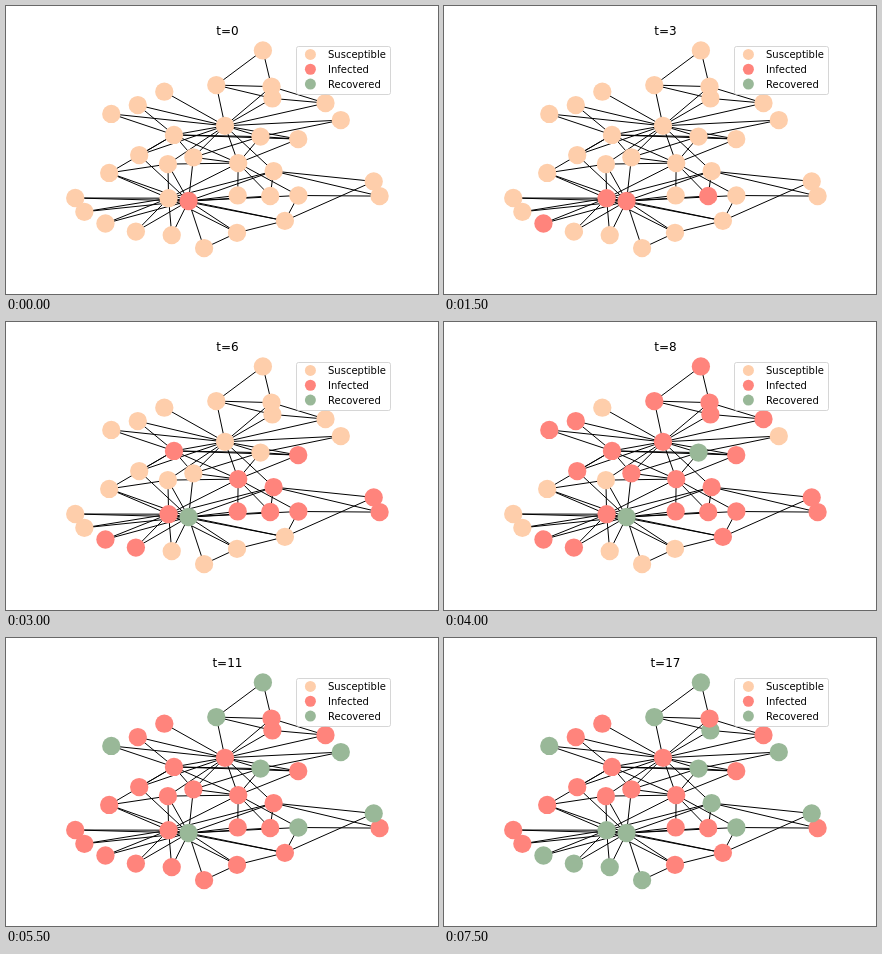
An HTML page for the animation above (8 s loop, 432 px wide and 288 px high).

```html
<!DOCTYPE html>
<html lang="en">
<head>
<meta charset="utf-8">
<title>Epidemic on a network</title>
<style>
  html, body { margin: 0; width: 100%; height: 100%; overflow: hidden; background: #fff; }
  svg { display: block; width: 432px; height: 288px; }
  text { font-family: "DejaVu Sans", sans-serif; font-size: 10px; fill: #000; }
  #title { font-size: 12px; text-anchor: middle; }
  line { stroke: #000; stroke-width: 1; }
</style>
</head>
<body>
<svg viewBox="0 0 432 288">
  <g id="edges"></g>
  <g id="nodes"></g>
  <g id="legend">
    <rect x="290.5" y="40.5" width="94" height="48" rx="2" fill="#fff" fill-opacity=".8" stroke="#ccc" stroke-opacity=".8"/>
  </g>
  <text id="title" x="221.4" y="29"></text>
</svg>
<script>
const STEP = 500, STEPS = 16;
const COLORS = { Susceptible: '#FECEAB', Infected: '#FF847C', Recovered: '#99B898' };
const HUBS = [32, 33];
const hubLeaves = [14, 15, 18, 20, 22];
const topLeaves = [21, 17, 11];

// Key points by node id; the leaves follow from rules below
const points = {
  0: [219, 119.8], 1: [168, 128.9], 2: [232.2, 157.1], 3: [254.5, 130.6],
  4: [266.4, 92.4], 5: [265.5, 80.6], 6: [210.3, 79.1], 7: [292.2, 133.1],
  8: [161.9, 158.1], 9: [231.7, 189.4], 10: [319.5, 97.1], 12: [334.8, 114.1],
  13: [187.4, 151.3], 16: [256.9, 44.4], 19: [133.2, 149.1], 23: [278.9, 214.8],
  24: [373.6, 190.1], 25: [367.7, 175.4], 26: [198.1, 242.1], 27: [292.4, 189.5],
  28: [264.2, 190], 29: [231, 226.8], 30: [103.2, 166.9], 31: [267.6, 165.1],
  32: [162.6, 192.2], 33: [182.6, 195]
};
hubLeaves.forEach((n, i) => {
  const a = (4 + 20.5 * i) * Math.PI / 180;
  points[n] = [173 - 104 * Math.cos(a), 189.2 + 40 * Math.sin(a)];
});
topLeaves.forEach((n, i) => {
  points[n] = [105.3 + 26.5 * i, 107.9 - 6.5 * i - 2.3 * i * i];
});

// Links to higher ids, apart from those to the two hubs
const links = {
  0: [1, 2, 3, 4, 5, 6, 7, 8, 10, 11, 12, 13, 17, 19, 21, 31],
  1: [2, 3, 7, 13, 17, 19, 21, 30],
  2: [3, 7, 8, 9, 13, 27, 28, 32],
  3: [7, 12, 13],
  4: [6, 10],
  5: [6, 10, 16],
  6: [16],
  8: [30],
  23: [25, 27, 29],
  24: [25, 27, 31],
  25: [31],
  26: [29],
  28: [31]
};
const bothHubs = [...hubLeaves, 8, 23, 29, 30, 31];
const lastHub = [9, 13, 19, 26, 27, 28, 32];

// Order of change, and how many nodes have changed by each step
const infection = {
  order: [33, 32, 18, 28, 2, 9, 31, 27, 1, 7, 25, 24, 20, 0, 3, 6, 13, 19, 23,
    16, 5, 4, 10, 17, 21, 8, 11, 29, 26, 30, 12, 15, 22, 14],
  totals: [1, 2, 3, 4, 6, 8, 13, 19, 25, 30, 33, 34]
};
const recovery = {
  order: [33, 3, 16, 21, 27, 6, 12, 25, 18, 26, 31, 32, 4, 20, 22],
  totals: [0, 0, 0, 0, 0, 0, 1, 1, 2, 3, 5, 8, 9, 10, 12, 15]
};
const reached = ({ order, totals }, step) => order.slice(0, totals[step] ?? order.length);

// Late in the run every third tick goes by unseen
const label = step => step < 12 ? step : step + Math.floor((step - 10) / 2);

const $ = id => document.getElementById(id);

function add(parent, tag, attrs, text = '') {
  const el = document.createElementNS('http://www.w3.org/2000/svg', tag);
  for (const k in attrs) el.setAttribute(k, attrs[k]);
  el.textContent = text;
  return parent.appendChild(el);
}

function link(a, b) {
  const [x1, y1] = points[a], [x2, y2] = points[b];
  add($('edges'), 'line', { x1, y1, x2, y2 });
}

for (const a in links) links[a].forEach(b => link(a, b));
for (const n of bothHubs) HUBS.forEach(hub => link(n, hub));
for (const n of lastHub) link(n, 33);

const dots = Object.values(points).map(([cx, cy]) => add($('nodes'), 'circle', { cx, cy, r: 9.16 }));

Object.entries(COLORS).forEach(([name, fill], i) => {
  add($('legend'), 'circle', { cx: 304.4, cy: 48.4 + 14.85 * i, r: 5.5, fill });
  add($('legend'), 'text', { x: 322, y: 52 + 15 * i }, name);
});

function paint(step) {
  const color = (nodes, name) => nodes.forEach(n => dots[n].setAttribute('fill', COLORS[name]));
  color([...dots.keys()], 'Susceptible');
  color(reached(infection, step), 'Infected');
  color(reached(recovery, step), 'Recovered');
  $('title').textContent = 't=' + label(step);
}

let shown = -1;
function tick() {
  const step = Math.floor(performance.now() / STEP) % STEPS;
  if (step !== shown) paint(shown = step);
  requestAnimationFrame(tick);
}
paint(shown = 0);
requestAnimationFrame(tick);
</script>
</body>
</html>
```
